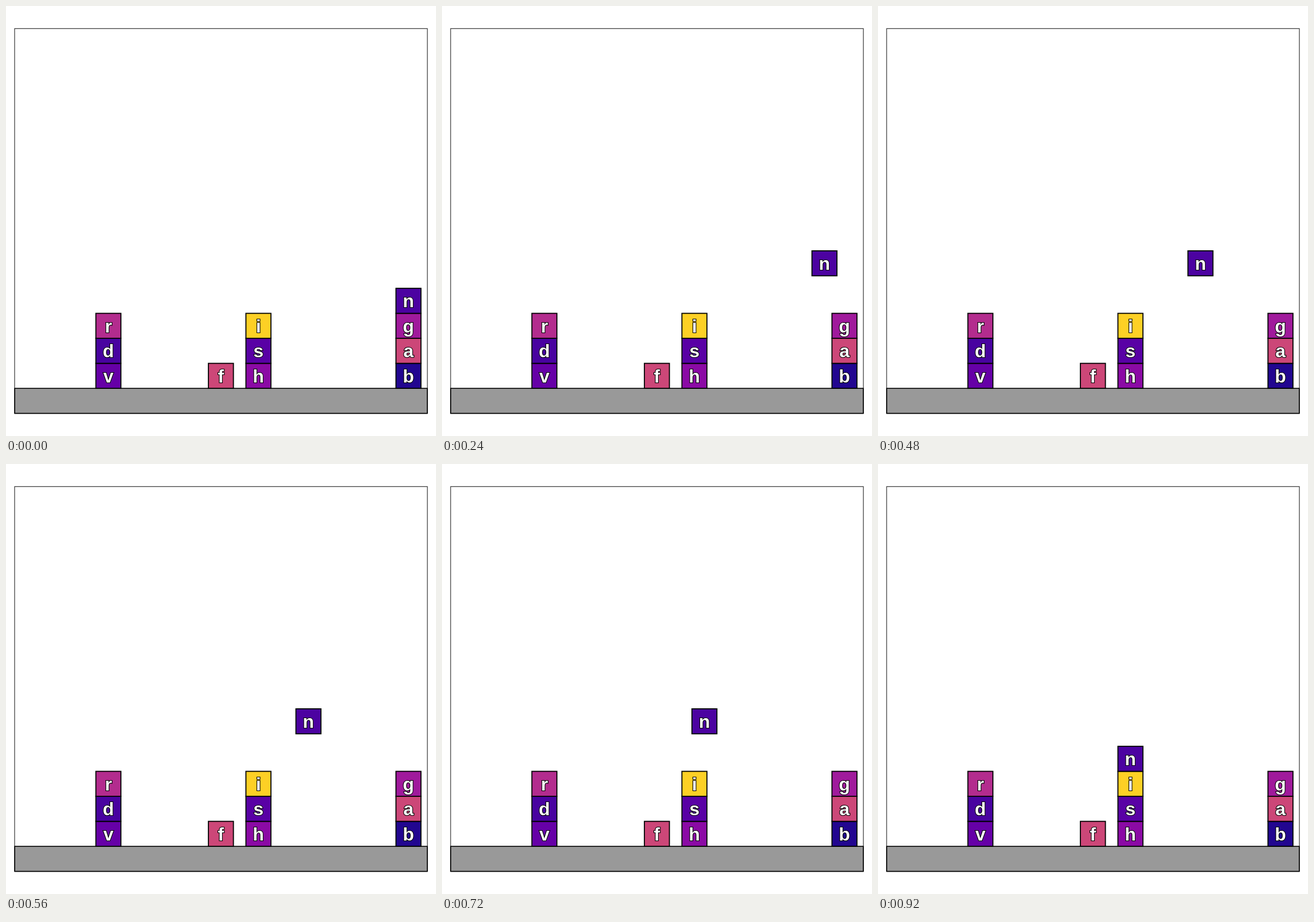
Write an HTML page that moves like this. It is 748x748 px and loops after 960 ms.

```html
<!DOCTYPE html>
<html lang="en">
<head>
<meta charset="utf-8">
<title>Stacking blocks</title>
<style>
  html, body { margin: 0; width: 100%; height: 100%; overflow: hidden; background: #fff; }
  svg { display: block; width: 100vw; height: 100vh; }
  rect { stroke: #000; stroke-width: 1.8; }
  text {
    font: bold 32px "Liberation Sans", Arial, sans-serif;
    text-anchor: middle;
    fill: #fff;
    stroke: #000;
    stroke-width: 2.2;
    paint-order: stroke;
  }
</style>
</head>
<body>
<svg id="stage" viewBox="0 0 748 748">
  <rect x="15" y="39.3" width="718" height="669.4" fill="none" style="stroke:#333;stroke-width:1.2"/>
  <rect x="15.2" y="665.1" width="717.6" height="43.5" fill="#999" style="stroke-width:1.6"/>
</svg>
<script>
const SIZE = 43.5, GAP = 65.25, FLOOR = 665.1;
const STEP = 40, STEPS = 24, LIFT = 4, SLIDE = 15;
const stage = document.getElementById('stage');

const columnX = column => 47.6 + column * GAP;
const levelY = level => FLOOR - (level + 1) * SIZE;
const clamp = v => Math.max(0, Math.min(1, v));

function add(parent, tag, attrs) {
  const el = document.createElementNS('http://www.w3.org/2000/svg', tag);
  for (const key in attrs) el.setAttribute(key, attrs[key]);
  return parent.appendChild(el);
}

function place(block, x, y) {
  block.setAttribute('transform', `translate(${x} ${y})`);
}

function addBlock(letter, color, column, level) {
  const block = add(stage, 'g', {});
  add(block, 'rect', { x: -SIZE / 2, width: SIZE, height: SIZE, fill: color });
  add(block, 'text', { y: 33.3 }).textContent = letter;
  place(block, columnX(column), levelY(level));
  return block;
}

// Each stack is listed from the floor up.
const stacks = {
  2: [['v', '#6600a7'], ['d', '#4903a0'], ['r', '#b32c8e']],
  5: [['f', '#cc4778']],
  6: [['h', '#8b0aa5'], ['s', '#5901a5'], ['i', '#fdd025']],
  10: [['b', '#220690'], ['a', '#cc4778'], ['g', '#a01a9c']]
};
for (const column in stacks) {
  stacks[column].forEach(([letter, color], level) => addBlock(letter, color, +column, level));
}
const mover = addBlock('n', '#4c02a1', 10, 3);

// Lift, slide to the other stack, then lower, all at constant speed.
function draw(now) {
  const step = Math.floor(now / STEP) % STEPS;
  const slid = clamp((step - LIFT) / SLIDE);
  const raised = clamp(step / LIFT) - clamp((step - LIFT - SLIDE) / LIFT);
  place(mover, columnX(10 - 4 * slid), levelY(3) - raised * GAP);
}

function tick() {
  draw(performance.now());
  requestAnimationFrame(tick);
}
tick();
</script>
</body>
</html>
```
